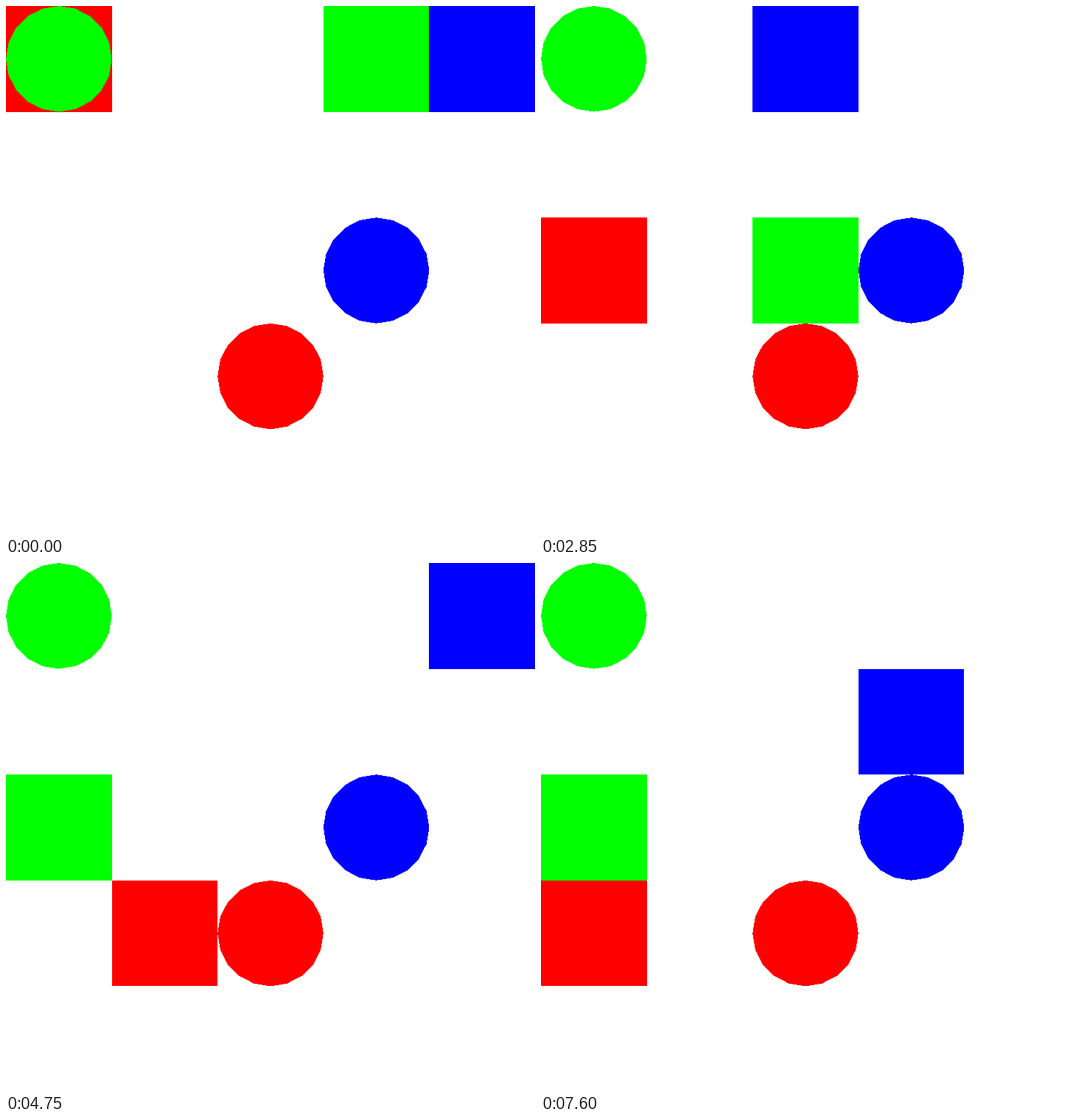
Animation, 748 px wide and 748 px high, one loop 8 s. Source, as an HTML page:

```html
<!DOCTYPE html>
<html lang="en">
<head>
<meta charset="utf-8">
<title>Grid walk</title>
<style>
  html, body { margin: 0; width: 100%; height: 100%; overflow: hidden; background: #fff; }
  svg { display: block; width: 748px; height: 748px; shape-rendering: crispEdges; }
</style>
</head>
<body>
<svg id="stage" viewBox="0 0 748 748"></svg>
<script>
const CELL = 748 / 5, STEP = 950, LOOP = 8000, SIDES = 20;
const RED = '#f00', GREEN = '#0f0', BLUE = '#00f';

// Column and row of each square, one pair per step
const walkers = [
  [RED, '00 00 01 02 03 13 03 03 03'],
  [GREEN, '30 20 21 22 12 02 02 02 02'],
  [BLUE, '40 30 20 20 30 40 40 41 31'],
];
const goals = [[RED, 2, 3], [GREEN, 0, 0], [BLUE, 3, 2]];

const stage = document.getElementById('stage');

function add(tag, attrs) {
  const el = document.createElementNS('http://www.w3.org/2000/svg', tag);
  for (const name in attrs) el.setAttribute(name, attrs[name]);
  return stage.appendChild(el);
}

function disc(col, row) {
  const r = CELL / 2;
  return Array.from({ length: SIDES }, (_, i) => {
    const a = i * 2 * Math.PI / SIDES;
    return [(col * CELL + r + r * Math.cos(a)).toFixed(2),
            (row * CELL + r + r * Math.sin(a)).toFixed(2)];
  }).join(' ');
}

for (const [fill, path] of walkers) {
  const frames = path.split(' ').map(([col, row], i) => ({
    x: col * CELL + 'px',
    y: row * CELL + 'px',
    offset: i * STEP / LOOP,
    easing: 'step-end',
  }));
  frames.push({ ...frames[frames.length - 1], offset: 1 });
  add('rect', { width: CELL, height: CELL, fill })
    .animate(frames, { duration: LOOP, iterations: Infinity });
}

for (const [fill, col, row] of goals) add('polygon', { points: disc(col, row), fill });
</script>
</body>
</html>
```
